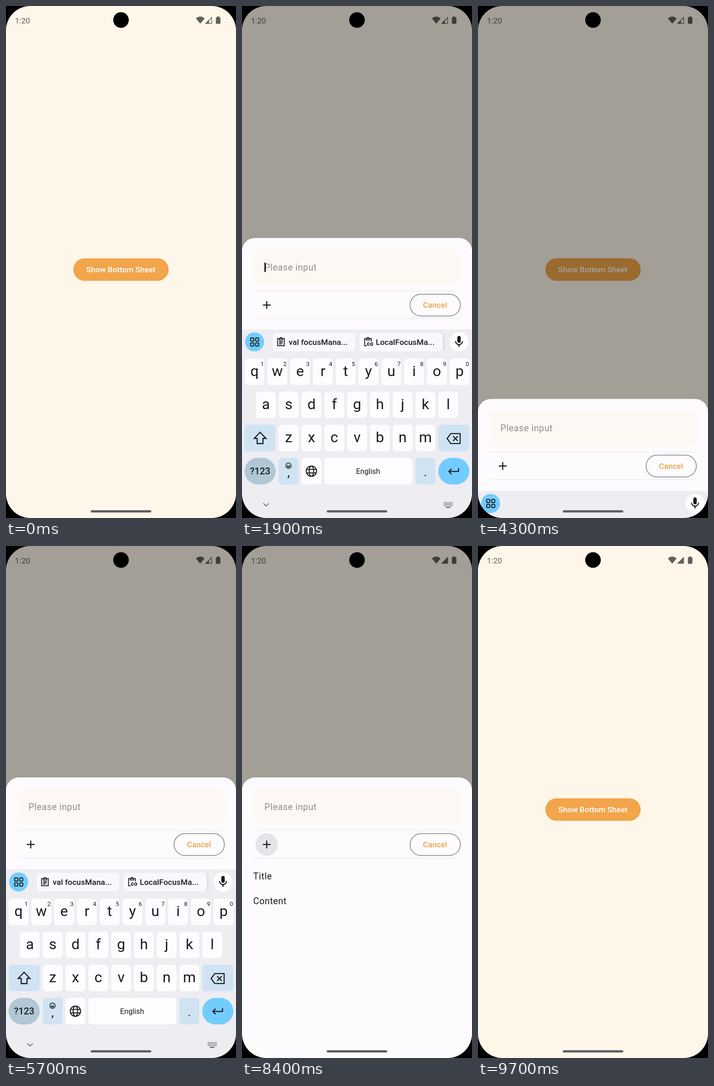
An HTML page with a canvas that plays this animation: 502 by 1115 pixels, repeating every 9800 ms.

```html
<!DOCTYPE html>
<html lang="en">
<head>
<meta charset="utf-8">
<title>Bottom sheet with keyboard</title>
<style>
html, body { margin: 0; width: 100%; height: 100%; overflow: hidden; background: #000; }
canvas { display: block; width: 502px; height: 1115px; }
</style>
</head>
<body>
<canvas id="stage"></canvas>
<script>
const W = 502, H = 1115, LOOP = 9800, STEP = 100;
const KB_H = 411, SHEET_TOP = 504, KB_TOP = 704;
const INK = '#1a1b1f', ORANGE = '#f2a54a', SHEET = '#fefbff';
const KEY = '#fdfcff', KEY_ALT = '#cfe3f3', SKY = '#73ccff', KB_BG = '#eeedf1';
const canvas = document.getElementById('stage');
const ctx = canvas.getContext('2d');
const dpr = window.devicePixelRatio || 1;
canvas.width = W * dpr;
canvas.height = H * dpr;

// Cubic Bezier easing, solved by bisection
function bezier(x1, y1, x2, y2) {
  const at = (a, b, s) => 3 * (1 - s) * (1 - s) * s * a + 3 * (1 - s) * s * s * b + s * s * s;
  return x => {
    if (x <= 0) return 0;
    if (x >= 1) return 1;
    let lo = 0, hi = 1;
    for (let i = 0; i < 24; i++) {
      const mid = (lo + hi) / 2;
      if (at(x1, x2, mid) < x) lo = mid; else hi = mid;
    }
    return at(y1, y2, lo);
  };
}
const imeEase = bezier(0.2, 0, 0, 1);
const standard = bezier(0.4, 0, 0.2, 1);
const ramp = (t, start, dur) => Math.min(1, Math.max(0, (t - start) / dur));

// Keyboard moves: [start, shown]
const IME_MS = 285;
const imeMoves = [[1567, 1], [2684, 0], [3450, 1], [4167, 0], [5050, 1], [6150, 0], [6850, 1], [8080, 0]];
const panelSpans = [[6100, 7150], [8000, 9800]];
const focusSpans = [[1600, 3400], [3400, 5000], [5000, 6100], [6850, 8000]];
const plusTaps = [6100, 6750, 8000];
const within = (t, spans) => spans.find(([a, b]) => t >= a && t < b);

function imeShown(t) {
  let v = 0;
  for (const [start, goal] of imeMoves) {
    if (t < start) break;
    const p = imeEase(ramp(t, start, IME_MS));
    v = goal ? p : 1 - p;
  }
  return v;
}
function imeOpening(t) {
  const past = imeMoves.filter(m => m[0] <= t);
  return past.length > 0 && past[past.length - 1][1] === 1;
}

function box(x, y, w, h, r, fill) {
  ctx.beginPath();
  ctx.roundRect(x, y, w, h, r);
  ctx.fillStyle = fill;
  ctx.fill();
}
function disc(x, y, r, fill) {
  ctx.beginPath();
  ctx.arc(x, y, r, 0, Math.PI * 2);
  ctx.fillStyle = fill;
  ctx.fill();
}
function text(str, x, y, size, color, { weight = 400, align = 'left', space = 0 } = {}) {
  ctx.font = `${weight} ${size}px Roboto, sans-serif`;
  ctx.letterSpacing = space + 'px';
  ctx.textAlign = align;
  ctx.fillStyle = color;
  ctx.fillText(str, x, y);
}
// Icons sit on a 24-unit grid centred on (x, y)
function icon(d, x, y, size, line = 0, color = INK) {
  const path = new Path2D(d);
  ctx.save();
  ctx.translate(x - size / 2, y - size / 2);
  ctx.scale(size / 24, size / 24);
  ctx.fillStyle = ctx.strokeStyle = color;
  ctx.lineWidth = line;
  if (line) ctx.stroke(path); else ctx.fill(path);
  ctx.restore();
}

const ICONS = {
  mic: 'M12 14a3 3 0 0 0 3-3V5a3 3 0 0 0-6 0v6a3 3 0 0 0 3 3z' +
    'M17.3 11a5.3 5.1 0 0 1-10.6 0H5a7 7 0 0 0 6 6.9V21h2v-3.1A7 7 0 0 0 19 11z',
  clip: 'M4 4H20V21H4zM8 4V7.5H16V4M10 3.5a2 2 0 0 1 4 0M7.5 11H16.5M7.5 14H16.5M7.5 17H13.5',
  clipLink: 'M9 21H4V4H20V11M8 4V7.5H16V4M10 3.5a2 2 0 0 1 4 0' +
    'M15 14H14a3.2 3.2 0 0 0 0 6.4H15M18 14H20a3.2 3.2 0 0 1 0 6.4H18M14.5 17.2H19.5',
  shift: 'M12 3L21 12.5H16.5V20.5H7.5V12.5H3z',
  erase: 'M8 4.5H22V19.5H8L2.5 12zM11.5 8.5L18.5 15.5M18.5 8.5L11.5 15.5',
  globe: 'M3 12a9 9 0 1 0 18 0a9 9 0 1 0-18 0M8 12a4 9 0 1 0 8 0a4 9 0 1 0-8 0M4 9H20M4 15H20',
  smile: 'M3 12a9 9 0 1 0 18 0a9 9 0 1 0-18 0M7.5 13.5a4.6 4.6 0 0 0 9 0zM8.5 7.5v2.5M15.5 7.5v2.5',
  enter: 'M21 7V13H4M8.5 8L3.5 13L8.5 18',
  down: 'M6 9L12 15L18 9'
};

function drawStatus(fullSignal) {
  const c = '#625f5b';
  text('1:20', 19.5, 38, 17.1, c);
  ctx.fillStyle = ctx.strokeStyle = c;
  ctx.fill(new Path2D('M424 38.6L414.6 27.2Q424 18.8 433.4 27.2Z'));
  if (fullSignal) {
    ctx.fill(new Path2D('M434.5 38.5H449.5V23.2Z'));
  } else {
    ctx.lineWidth = 1.4;
    ctx.stroke(new Path2D('M436.2 37.8H448.8V25Z'));
    ctx.fill(new Path2D('M435 38.5H443V30.5Z'));
  }
  box(458, 24.5, 10, 14.2, 1.5, c);
  box(460.8, 22.7, 4.4, 3, 0.6, c);
}

function drawHome(fullSignal, scrim) {
  ctx.fillStyle = '#fff6ea';
  ctx.fillRect(0, 0, W, H);
  drawStatus(fullSignal);
  box(147, 549.5, 208, 49, 24.5, ORANGE);
  text('Show Bottom Sheet', 250.8, 580, 17.1, '#fff', { weight: 500, align: 'center' });
  ctx.fillStyle = `rgba(0,0,0,${0.36 * scrim})`;
  ctx.fillRect(0, 0, W, H);
}

function drawRipple(t) {
  for (const tap of plusTaps) {
    if (t < tap || t >= tap + 500) continue;
    const grow = standard(ramp(t, tap - 60, 225));
    const fade = 1 - ramp(t, tap + 400, 150);
    disc(54, 146, 24.4 * (0.3 + 0.7 * grow), `rgba(28,27,31,${0.1 * fade})`);
  }
}

function drawSheet(t, top) {
  ctx.save();
  ctx.translate(0, top);
  box(0, 0, W, H, [28, 28, 0, 0], SHEET);
  box(24.6, 24.4, 452.6, 78.6, 15, '#fef8f4');
  text('Please input', 49, 70.5, 19.54, '#918d8d', { space: 0.61 });
  const focus = within(t, focusSpans);
  if (focus && Math.floor((t - focus[0]) / 500) % 2 === 0) {
    ctx.fillStyle = '#000';
    ctx.fillRect(49, 53.5, 2.5, 20.5);
  }
  ctx.fillStyle = '#eceaee';
  ctx.fillRect(24.5, 115, 452.5, 1.2);
  ctx.fillRect(24.5, 175, 452.5, 1.2);
  drawRipple(t);
  ctx.fillStyle = INK;
  ctx.fillRect(45.5, 144.8, 17, 2.4);
  ctx.fillRect(52.8, 137.5, 2.4, 17);
  ctx.beginPath();
  ctx.roundRect(366.8, 122.4, 109.8, 47.4, 23.7);
  ctx.strokeStyle = '#6c696f';
  ctx.lineWidth = 1.3;
  ctx.stroke();
  text('Cancel', 421.3, 152, 17.1, '#eea341', { weight: 500, align: 'center' });
  if (within(t, panelSpans)) {
    text('Title', 24.6, 222, 19.54, INK, { space: 0.61 });
    text('Content', 24.6, 276, 19.54, INK, { space: 0.61 });
  }
  ctx.restore();
}

function drawToolbar(chips) {
  disc(27.5, 731.5, 20.8, SKY);
  ctx.strokeStyle = INK;
  ctx.lineWidth = 2;
  for (const x of [18.8, 29.6]) for (const y of [722.8, 733.6]) {
    ctx.beginPath();
    ctx.roundRect(x, y, 7, 7, 1.8);
    ctx.stroke();
  }
  if (chips) {
    const chip = (x, label, glyph) => {
      box(x, 712, 180, 40, 8, '#f7f9fd');
      icon(glyph, x + 18, 731.5, 22, 2);
      text(label, x + 35, 737.5, 17.4, INK, { weight: 500 });
    };
    chip(67, 'val focusMana...', ICONS.clip);
    chip(257, 'LocalFocusMa...', ICONS.clipLink);
    ctx.fillStyle = '#c9c9cd';
    ctx.fillRect(440, 714, 1.2, 35);
  }
  disc(473.7, 731.5, 20.8, '#fff');
  icon(ICONS.mic, 473.7, 731, 30);
}

function drawKeyRow(letters, x, y, hints = '') {
  [...letters].forEach((ch, i) => {
    const kx = x + i * 49.75;
    box(kx, y, 43.3, 57.5, 7, KEY);
    text(ch, kx + 21.7, y + 38, 32, INK, { align: 'center' });
    if (hints) text(hints[i], kx + 38.5, y + 15.5, 13, INK, { align: 'center' });
  });
}

function drawKeyboard(top, chips) {
  ctx.save();
  ctx.translate(0, top - KB_TOP);
  ctx.fillStyle = KB_BG;
  ctx.fillRect(0, KB_TOP, W, KB_H);
  drawToolbar(chips);
  drawKeyRow('qwertyuiop', 5.6, 768, '1234567890');
  drawKeyRow('asdfghjkl', 30.5, 840);
  drawKeyRow('zxcvbnm', 80.2, 912);
  box(5.6, 912, 68, 57.5, 7, KEY_ALT);
  icon(ICONS.shift, 39.5, 941, 34, 1.7);
  box(428.5, 912, 68, 57.5, 7, KEY_ALT);
  icon(ICONS.erase, 461.5, 942, 35, 1.6);

  box(5.6, 984, 68, 58, 29, '#b1c7d5');
  text('?123', 39.6, 1020, 20.3, INK, { weight: 500, align: 'center' });
  box(80.2, 984, 43.3, 58, 7, KEY_ALT);
  icon(ICONS.smile, 101.5, 1001, 16, 2.2);
  text(',', 101.7, 1025, 24, INK, { weight: 500, align: 'center' });
  box(130, 984, 43.3, 58, 7, KEY);
  icon(ICONS.globe, 151.5, 1013, 30, 1.7);
  box(179.7, 984, 192, 58, 7, KEY);
  text('English', 275.2, 1018.5, 16.2, INK, { align: 'center' });
  box(378.5, 984, 43.3, 58, 7, KEY_ALT);
  text('.', 400.2, 1024, 26, INK, { align: 'center' });
  box(428.3, 984, 68, 58, 29, SKY);
  icon(ICONS.enter, 461.7, 1012.5, 29, 1.9);

  icon(ICONS.down, 52.5, 1086, 24, 1.7, '#5d5e63');
  ctx.fillStyle = '#5d5e63';
  for (let r = 0; r < 3; r++) for (let i = 0; i < 6; i++) {
    ctx.fillRect(440.5 + i * 3.4, 1080.5 + r * 3.4, 2, 2);
  }
  ctx.fillRect(445, 1091, 10, 2);
  ctx.restore();
}

function drawDevice() {
  box(185, 1098, 132, 5, 2.5, '#616063');
  disc(251, 30.5, 17, '#000');
  ctx.beginPath();
  ctx.rect(0, 0, W, H);
  ctx.roundRect(0, 0, W, H, 53);
  ctx.fillStyle = '#000';
  ctx.fill('evenodd');
}

function render(t) {
  const shown = imeShown(t);
  const scrim = standard(ramp(t, 1500, 300)) - standard(ramp(t, 8750, 350));
  const open = standard(ramp(t, 1590, 330)) - standard(ramp(t, 8750, 320));
  const drop = within(t, panelSpans) ? 0 : (1 - shown) * KB_H;
  ctx.setTransform(dpr, 0, 0, dpr, 0, 0);
  drawHome(t >= 7400, scrim);
  if (open > 0) drawSheet(t, SHEET_TOP + drop + (1 - open) * (H - SHEET_TOP));
  if (shown > 0) drawKeyboard(H - shown * KB_H, imeOpening(t));
  drawDevice();
}

const begin = performance.now();
function tick() {
  const t = (performance.now() - begin) % LOOP;
  render(Math.floor(t / STEP) * STEP);
  requestAnimationFrame(tick);
}
tick();
</script>
</body>
</html>
```
